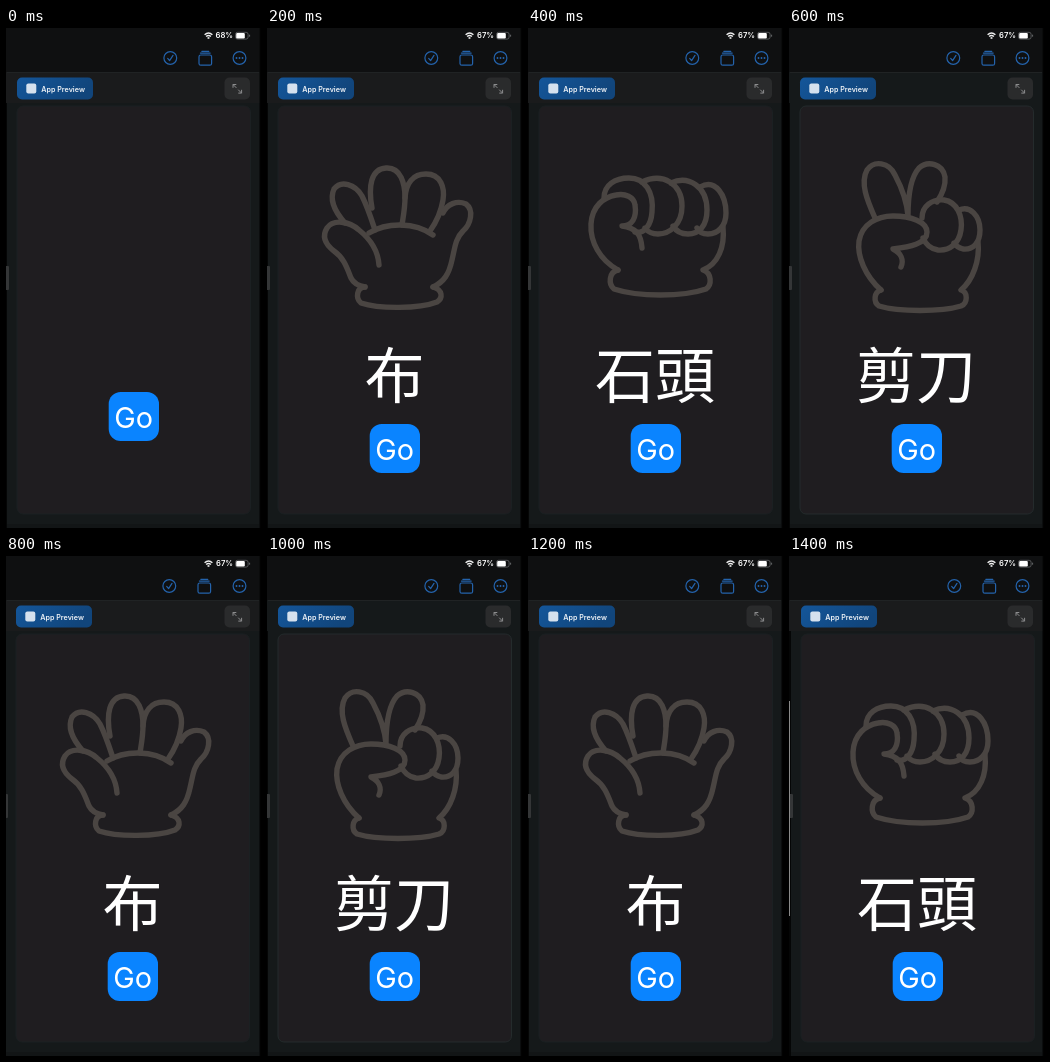
An HTML page for the animation above (1600 ms loop, 255 by 500 pixels).

```html
<!DOCTYPE html>
<html lang="zh-Hant">
<head>
<meta charset="utf-8">
<title>Rock, scissors, paper</title>
<style>
  html, body { margin: 0; width: 100%; height: 100%; overflow: hidden; background: #0f1011; }
  svg { display: block; width: 100%; height: 100%; }
  text { font-family: Inter, Roboto, sans-serif; fill: #fff; }
  .word { font: 350 60px "Noto Sans CJK TC", "Noto Sans CJK JP", "Noto Sans CJK", sans-serif; text-anchor: middle; }
  .hand { fill: none; stroke: #4a4542; stroke-width: 5.4; stroke-linecap: round; stroke-linejoin: round; }
  .icon { fill: none; stroke: #2463ac; stroke-width: 1.2; stroke-linecap: round; stroke-linejoin: round; }

  .anim { animation: 1600ms step-end infinite; }
  .rock { animation-name: rock; }
  .scissors { animation-name: scissors; }
  .paper { animation-name: paper; }
  .go { animation-name: drop; }
  .sway { animation-name: sway; }
  .edge { animation-name: edge; }
  .head { animation-name: head; }
  .full { animation-name: full; }
  .used { animation-name: used; }
  .bar { animation-name: bar; }

  @keyframes rock {
    0%, 37.5% { visibility: hidden; }
    25%, 87.5%, 100% { visibility: visible; }
  }
  @keyframes scissors {
    0%, 50%, 75%, 100% { visibility: hidden; }
    37.5%, 62.5% { visibility: visible; }
  }
  @keyframes paper {
    0%, 25%, 62.5%, 87.5%, 100% { visibility: hidden; }
    12.5%, 50%, 75% { visibility: visible; }
  }
  @keyframes drop {
    0% { transform: translateY(-32px); }
    12.5%, 100% { transform: translateY(0); }
  }
  @keyframes sway {
    0%, 62.5% { transform: translateX(0); }
    50% { transform: translateX(-1px); }
    87.5%, 100% { transform: translateX(1px); }
  }
  @keyframes edge {
    0%, 50%, 75%, 100% { stroke: #1b2022; }
    37.5%, 62.5% { stroke: #242b2c; }
  }
  @keyframes head {
    0%, 50%, 75%, 100% { visibility: visible; }
    37.5%, 62.5% { visibility: hidden; }
  }
  @keyframes full {
    0% { visibility: visible; }
    12.5%, 100% { visibility: hidden; }
  }
  @keyframes used {
    0% { visibility: hidden; }
    12.5%, 100% { visibility: visible; }
  }
  @keyframes bar {
    0% { visibility: hidden; }
    87.5%, 100% { visibility: visible; }
  }
</style>
</head>
<body>
<svg viewBox="0 0 255 500" preserveAspectRatio="none">
  <defs>
    <linearGradient id="blue" x2="1" y2="0.3">
      <stop offset="0" stop-color="#14569a"/>
      <stop offset="1" stop-color="#11457b"/>
    </linearGradient>
  </defs>

  <!-- window -->
  <rect width="255" height="500" fill="#0f1011"/>
  <rect y="44" width="253.5" height="456" fill="#15191a"/>
  <rect class="anim head" y="44" width="253.5" height="31" fill="#1a1b1c"/>
  <path d="M1 44.5H253" stroke="#202324"/>
  <rect y="496" width="253.5" height="4" fill="#121516"/>
  <rect class="anim sway" x="-3" y="75" width="4" height="425" fill="#050606"/>
  <rect x="253.7" width="1.3" height="500" fill="#020202"/>

  <!-- status bar -->
  <g fill="none" stroke="#eee" stroke-width="1.4">
    <path d="M198.6 6.8Q202.5 3.2 206.4 6.8M200.1 8.6Q202.5 6.4 204.9 8.6"/>
    <circle cx="202.5" cy="10" r=".4"/>
  </g>
  <g font-size="7.7" font-weight="600">
    <text class="anim full" x="209.5" y="10.4">68%</text>
    <text class="anim used" x="210" y="10.4">67%</text>
  </g>
  <rect x="229.5" y="4.3" width="12.6" height="6.8" rx="2" fill="none" stroke="#66686a" stroke-width=".8"/>
  <rect x="230.2" y="4.9" width="8.6" height="5.6" rx="1.2" fill="#fff"/>
  <path d="M243.6 6.7V8.7" stroke="#66686a"/>

  <!-- toolbar -->
  <g class="icon">
    <g class="anim sway">
      <circle cx="164.3" cy="30" r="6.4"/>
      <path d="M161.7 30.4L163.6 32.6L167 27.4"/>
      <rect x="193" y="27" width="12.6" height="10.2" rx="1.8"/>
      <path d="M194.4 25.1H204.2M195.8 23.3H202.8"/>
    </g>
    <circle cx="233.5" cy="30" r="6.4"/>
    <path d="M230.5 30h.01M233.5 30h.01M236.5 30h.01" stroke-width="1.9"/>
  </g>

  <rect x="218.5" y="49.5" width="25.5" height="22" rx="5" fill="#2a2b2c"/>
  <path d="M230.4 59.9L227 56.5M227 59.8V56.5H230.3M232.2 61.7L235.6 65.1M235.6 61.8V65.1H232.3" fill="none" stroke="#8b8c8d"/>

  <g class="anim sway">
    <rect x="11" y="49.5" width="76" height="22" rx="5" fill="url(#blue)"/>
    <rect x="20.3" y="55.6" width="10" height="10" rx="2" fill="#d5e1ee"/>
    <text x="35.2" y="63.7" font-size="7.2" font-weight="600" fill-opacity=".92">App Preview</text>

    <rect class="anim edge" x="11" y="78" width="233.5" height="408" rx="6" fill="#1f1d20"/>
    <rect x="-2" y="238" width="5" height="24" rx="1" fill="#343637"/>

    <g class="anim rock">
      <g class="hand">
        <path d="M90 242C72 232 62 214 63 196C64 178 76 169 88 167C97 165 106 169 107 177C109 190 104 198 94 198C108 200 113 206 114 220"/>
        <path d="M76 170C76 157 87 150 101 150C117 150 126 164 124 184C123 198 116 206 107 204"/>
        <path d="M114 154C135 144 154 156 154 178C154 196 142 206 130 206C125 206 120 204 117 200"/>
        <path d="M143 155C160 147 179 158 179 182C179 198 171 206 160 206C153 206 148 203 145 198"/>
        <path d="M172 159C188 150 198 168 198 185C198 198 190 206 180 206C175 206 171 204 169 200"/>
        <path d="M195 199C197 219 190 236 175 242C184 245 184 257 178 261C155 269 110 269 86 261C80 256 81 244 90 242"/>
      </g>
      <text class="word" x="127" y="370">石頭</text>
    </g>

    <g class="anim scissors">
      <g class="hand">
        <path d="M86 190C78 172 71 155 78 142C85 132 100 134 106 147C114 162 118 176 119 188C119 170 121 150 130 140C139 132 154 136 156 149C157 160 152 168 148 174"/>
        <path d="M92 262C76 248 68 228 70 213C73 196 88 188 104 188C122 188 138 194 138 204C138 216 120 219 104 221C112 225 115 232 112 239"/>
        <path d="M133 190C133 178 143 171 155 172C168 174 174 188 172 202C170 216 160 223 149 222C142 221 137 217 134 210"/>
        <path d="M170 182C181 177 191 188 191 202C191 215 184 222 174 221C170 220 167 218 165 215"/>
        <path d="M189 214C191 232 184 252 172 262C179 264 179 275 172 278C152 284 110 284 90 278C84 274 85 264 92 262"/>
      </g>
      <text class="word" x="127" y="370">剪刀</text>
    </g>

    <g class="anim paper">
      <g class="hand">
        <path d="M112 237C111 222 102 210 92 202C82 193 66 191 60 200C55 208 58 216 67 223C77 230 80 240 84 250C87 256 92 258 98 259"/>
        <path d="M78 195C69 185 62 172 67 161C74 152 88 156 95 168C101 180 105 193 108 202"/>
        <path d="M105 180C101 158 104 141 119 140C134 139 138 156 138 170C138 180 136 190 135 197"/>
        <path d="M138 170C139 155 146 146 159 146C174 146 178 160 176 172C174 184 168 196 163 203"/>
        <path d="M176 185C180 176 190 172 199 176C207 182 204 196 196 203C188 211 188 220 185 232C182 246 177 254 166 259"/>
        <path d="M102 205C120 194 148 194 166 207"/>
        <path d="M98 259C90 259 88 270 94 275C112 281 152 281 170 274C176 270 176 262 166 259"/>
      </g>
      <text class="word" x="127.5" y="370">布</text>
    </g>

    <g class="anim go">
      <rect x="102.7" y="396" width="50.3" height="49" rx="12" fill="#0a84ff"/>
      <text x="127.7" y="431.6" font-size="28.8" text-anchor="middle">Go</text>
    </g>
  </g>

  <rect class="anim bar" y="145" width="1" height="215" fill="#8a8a8a"/>
</svg>
</body>
</html>
```
